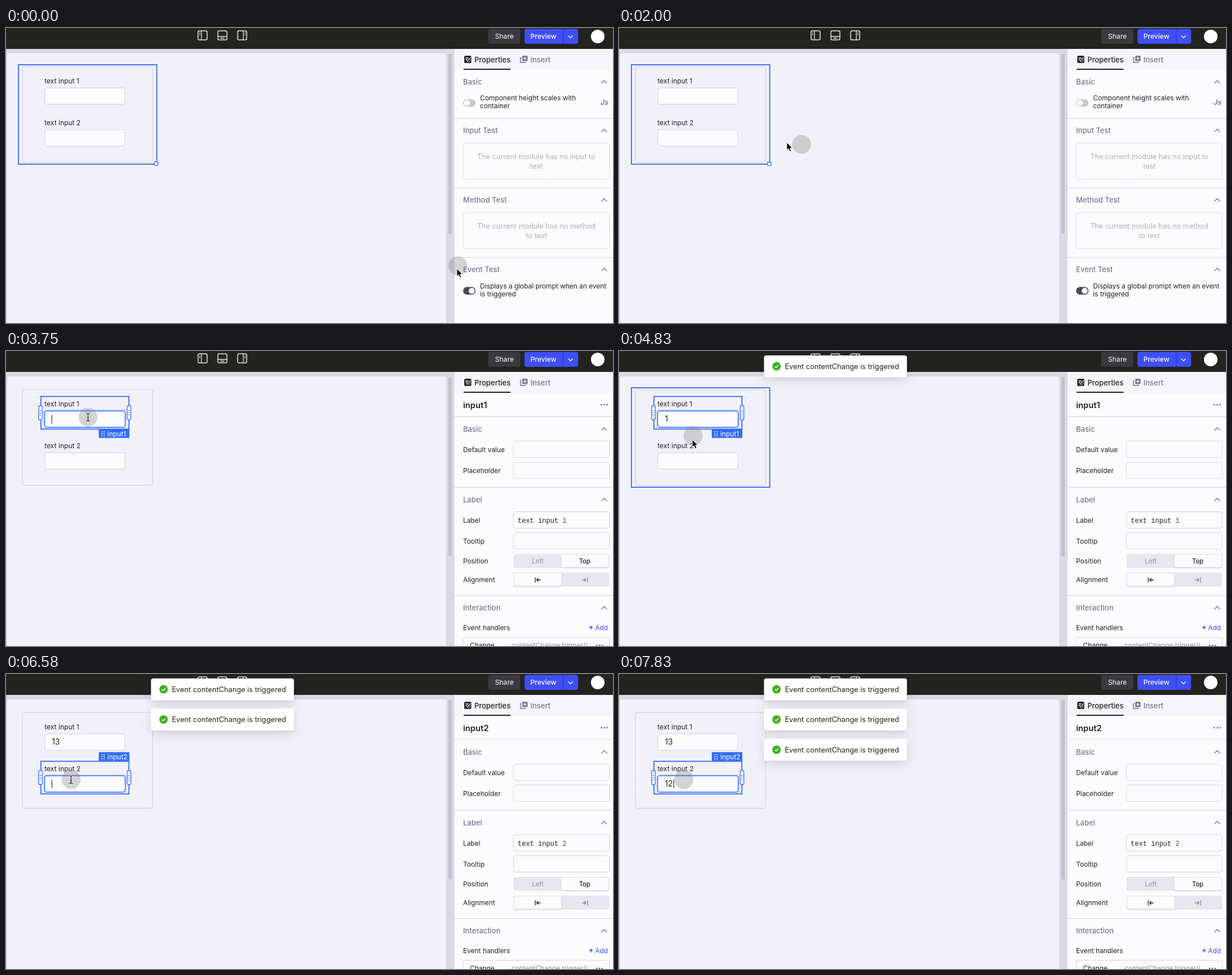
These frames come from a looping animation (1073 by 522 pixels, 8000 ms). An HTML page:

```html
<!DOCTYPE html>
<html lang="en">
<head>
<meta charset="utf-8">
<title>Module event test</title>
<style>
  html, body { margin: 0; width: 1073px; height: 522px; overflow: hidden; background: #dadae5; }
  svg { display: block; font-family: Inter, "Liberation Sans", sans-serif; }
  text { white-space: pre; }
  .toast rect {
    filter: drop-shadow(0 2px 2px rgba(0,0,0,.04)) drop-shadow(0 5.5px 7.4px rgba(0,0,0,.08))
      drop-shadow(0 8px 13px rgba(0,0,0,.06));
  }
  .raised { filter: drop-shadow(0 1px 1px rgba(0,0,0,.16)); }
</style>
</head>
<body>
<svg id="stage" width="1073" height="522" viewBox="0 0 1073 522"></svg>
<script>
const INK = '#222225', MUTED = '#77788f', BLUE = '#316cf9', LINE = '#d3d3df', PAPER = '#fcfcff';
const LOOP = 8000, SLOT = 53.5, BODY = 11.85, HEAD = 12.95;

// Markup helpers; text is placed by the vertical centre of its capitals.
const text = (x, cy, str, size = BODY, fill = INK, extra = '') =>
  `<text x="${x}" y="${cy + size * .36}" font-size="${size}" fill="${fill}" ${extra}>${str}</text>`;
const rect = (x, y, w, h, fill = 'none', stroke = 'none', r = 0, extra = '') =>
  `<rect x="${x}" y="${y}" width="${w}" height="${h}" rx="${r}" fill="${fill}" stroke="${stroke}" ${extra}/>`;
const path = (d, stroke, width = 1.3, extra = '') =>
  `<path d="${d}" fill="none" stroke="${stroke}" stroke-width="${width}" ${extra}/>`;
const dot = (x, y, r, fill) => `<circle cx="${x}" cy="${y}" r="${r}" fill="${fill}"/>`;
const group = (id, body, extra = '') => `<g id="${id}" ${extra}>${body}</g>`;
const MID = 'text-anchor="middle"', MEDIUM = ' font-weight="500"';

const divider = y => rect(793, y - .5, 280, 1.2, '#dadae8');
const section = (cy, title) => text(808, cy, title, HEAD, MUTED, MEDIUM) +
  path(`M1052.5 ${cy + 2.5}l5-5 5 5`, MUTED, 1.4);
const field = y => rect(897, y, 169.5, 29, PAPER, LINE, 4);
const ellipsis = (x, y) => [0, 5, 10].map(d => dot(x + d, y, 1.5, MUTED)).join('');
const toggle = (cy, fill, knob) => rect(808, cy - 6.8, 22, 13.6, fill, 'none', 6.8) + dot(knob, cy, 5.2, '#fff');

function topBar() {
  const frame = x => rect(x, 5, 16, 16, 'none', '#e6e6e8', 2.5, 'stroke-width="1.5"');
  const icons = frame(339.5) + path('M345.5 5v16M341.5 9h2M341.5 12h2', '#e6e6e8') +
    frame(374.5) + path('M374.5 15h16M379 18h7', '#e6e6e8') +
    frame(409.5) + path('M419.5 5v16M421.5 9h2M421.5 12h2', '#e6e6e8');
  return rect(0, 0, 1073, 37, '#232320') + icons +
    rect(852.5, 1.5, 56.5, 26.5, '#39393f', 'none', 4) + text(881, 15, 'Share', 12.1, '#fff', MID) +
    rect(916.5, 1.5, 94.8, 26.5, '#3d4ff5', 'none', 4) + rect(984.5, 1.5, 1, 26.5, '#2a36b8') +
    text(950, 15, 'Preview', 12.1, '#fff', MID + MEDIUM) +
    path('M994 13.500l4 4 4-4', '#fff', 1.5) + dot(1046, 15, 12, '#fff');
}

function tabs() {
  return rect(793, 37, 280, 485, PAPER) + rect(793, 37, 280, 37, '#f6f5fc') +
    rect(810, 49, 12.5, 13, INK, 'none', 2.5) +
    path('M812.5 53h5M812.5 56h3', '#fff', 1.3) +
    path('M816 60l6.5-7', '#f6f5fc', 4) + path('M816.5 60l6-6.5', INK, 2) +
    text(828, 56, 'Properties', HEAD, INK, MEDIUM) + rect(809, 72, 83, 2, INK) +
    path('M911 52.5h-1.5v8.5h8.5v-1.5', MUTED, 1.6) + rect(912.5, 49, 9.5, 9.5, MUTED, 'none', 1.5) +
    path('M917.25 51v5.5M914.5 53.75h5.5', '#f6f5fc', 1.3) +
    text(927, 56, 'Insert', HEAD, MUTED, MEDIUM);
}

function modulePanel() {
  const note = (y, first, second) =>
    rect(808, y, 258.5, 64, 'none', '#d3d3dc', 4, 'stroke-dasharray="3 2"') +
    text(937.5, y + 24, first, 12.6, '#aeaeb5', MID) + text(937.5, y + 40.5, second, 12.6, '#aeaeb5', MID);
  return section(95.5, 'Basic') + toggle(132.8, '#cbcacf', 814.8) +
    text(838, 124, 'Component height scales with') + text(838, 138, 'container') +
    text(1051, 131, 'Js', 12.5, MUTED, 'font-weight="600" font-style="italic"') +
    divider(160) + section(181.5, 'Input Test') + note(203.5, 'The current module has no input to', 'test') +
    divider(283) + section(304.5, 'Method Test') + note(326.5, 'The current module has no method', 'to test') +
    divider(406) + section(427.5, 'Event Test') + toggle(465, '#464b5b', 823.2) +
    text(838, 456.5, 'Displays a global prompt when an event') + text(838, 470.5, 'is triggered');
}

function inputPanel() {
  const label = (cy, name) => text(808, cy, name);
  const segment = (y, x) => rect(897, y, 169.5, 25, '#e8e7ef', 'none', 4) +
    rect(x, y + 1.2, 83.5, 22.6, PAPER, 'none', 3.5, 'class="raised"');
  return text(808, 95.5, '', 14.7, INK, 'id="title" font-weight="600"') + ellipsis(1052.5, 95) +
    divider(116) + section(138, 'Basic') +
    label(174.5, 'Default value') + field(159.5) + label(211.5, 'Placeholder') + field(196.5) +
    divider(241) + section(263, 'Label') + label(299.5, 'Label') + field(284.5) +
    `<text x="904.5" y="303.5" font-size="12" fill="${INK}" font-family="'Liberation Mono', monospace">text input <tspan id="labelDigit" fill="#2a5c4a"></tspan></text>` +
    label(336.5, 'Tooltip') + field(321.5) +
    label(371.5, 'Position') + segment(359, 981.7) +
    text(940, 371.5, 'Left', 11.2, '#9192a2', MID) + text(1023, 371.5, 'Top', 11.2, INK, MID + MEDIUM) +
    label(405, 'Alignment') + segment(392, 898.2) +
    path('M935.5 400.5v9M945 405h-7m3-3l-3 3 3 3', INK) +
    path('M1028 400.5v9M1018 405h7m-3-3l3 3-3 3', '#86879a') +
    divider(432.5) + section(454.5, 'Interaction') + label(489.5, 'Event handlers') +
    path('M1031 489.3h6.6M1034.3 486v6.6', '#3d4ff5', 1.6) +
    text(1064, 489.5, 'Add', BODY, '#3d4ff5', 'text-anchor="end"') +
    rect(808, 506.5, 258.5, 36, PAPER, LINE, 4) + text(820, 521, 'Change') +
    text(893.5, 521, 'contentChange.trigger()', BODY, '#9192a2') + ellipsis(1044, 521);
}

// Both inputs share one drawing, 74px apart.
function inputWidget(n) {
  const handle = x => rect(x, 96.5, 6.5, 25.5, '#fff', BLUE, 3, 'stroke-width="1.3"') +
    path(`M${x + 1.7} 105.5h3M${x + 1.7} 109.3h3M${x + 1.7} 113.1h3`, BLUE, 1);
  return `<g transform="translate(0 ${(n - 1) * 74})">` +
    text(68, 94, 'text input ' + n, 12.05) +
    group('outline' + n, rect(61.7, 80.5, 155.6, 57.7, 'none', BLUE, 0, 'stroke-width="1.8"')) +
    rect(68.5, 106, 142, 29, PAPER, '#cfcfd8', 4) +
    group('ring' + n, rect(67.2, 104.8, 144.6, 31.4, 'none', '#cfdcff', 5, 'stroke-width="2"') +
      rect(68.3, 106, 142.4, 29, PAPER, BLUE, 4, 'stroke-width="1.5"')) +
    text(81, 120.5, '', 13.8, INK, `id="value${n}"`) +
    group('caret' + n, rect(0, 113, 1.1, 15, INK)) +
    group('handles' + n, handle(57.7) + handle(214.2)) + '</g>';
}

function tag() {
  const grip = [0, 1, 2, 3, 4, 5].map(i => dot(169.5 + (i % 2) * 4, 143 + (i >> 1) * 3.5, 1, '#fff')).join('');
  return group('tag', rect(164, 138.3, 54, 15.5, BLUE) + grip +
    text(179, 146.5, '', 12, '#fff', 'id="tagName"'));
}

const toast = i => group('toast' + i, rect(256.3, 7.7, 252.7, 38.7, '#fff', 'none', 4) +
  dot(278.5, 27, 7.5, '#3fb01b') + path('M275.3 27.2l2.3 2.3 4.2-4.6', '#fff', 1.5) +
  text(293.2, 27.2, 'Event contentChange is triggered', 12.75), 'class="toast"');

const stage = document.getElementById('stage');
stage.innerHTML = topBar() +
  rect(0, 37, 793, 485, '#dadae5') + rect(2, 45, 776, 490, '#f2f1fa', 'none', 4) +
  rect(782, 46, 6, 318, '#c2c2cd', 'none', 3) +
  rect(29, 68, 230.5, 169.5, 'none', '#cfcfd5', 4) +
  group('boxOutline', rect(22, 65, 244.5, 176, 'none', BLUE, 0, 'stroke-width="1.8"')) +
  group('boxGrip', rect(262.3, 237, 6.4, 6.4, '#fff', BLUE, 1.5, 'stroke-width="1.3"')) +
  inputWidget(1) + inputWidget(2) + tag() + tabs() +
  group('modulePanel', modulePanel()) + group('inputPanel', inputPanel()) +
  [0, 1, 2, 3].map(toast).join('') +
  group('halo', dot(0, 0, 16.8, 'rgba(120,120,116,.3)')) +
  group('arrow', '<path d="M0 0v13.5l3.1-2.9 2.3 5.2 2.4-1-2.3-5h4.3z" fill="#000" stroke="#fff" stroke-width=".9"/>') +
  group('beam', ['#fff', '#111'].map((c, i) =>
    path('M-3.5-7q3 0 3.5 2 .5-2 3.5-2M0-5v10M-3.5 7q3 0 3.5-2 .5 2 3.5 2M-1.5 1.5h3', c, i ? 1.2 : 2.6)).join(''));

const el = {};
stage.querySelectorAll('[id]').forEach(node => el[node.id] = node);
const show = (id, on) => el[id].setAttribute('visibility', on ? 'visible' : 'hidden');
const move = (id, x, y) => el[id].setAttribute('transform', `translate(${x} ${y})`);
const within = (t, from, to) => t >= from && t < to;
const clamp = v => Math.min(1, Math.max(0, v));
const outCirc = u => Math.sqrt(1 - (1 - u) ** 2);
const inOutCirc = u => u < .5 ? (1 - Math.sqrt(1 - 4 * u * u)) / 2 : (1 + Math.sqrt(1 - (2 - 2 * u) ** 2)) / 2;

// Pointer route: time, x, y
const ROUTE = [
  [0, 799, 421], [85, 798, 421], [170, 791, 482], [260, 790, 483], [420, 815, 505], [660, 925, 500],
  [840, 1020, 450], [930, 1044, 405], [1080, 1046, 418], [1170, 1035, 419], [1340, 870, 440],
  [1500, 779, 447], [1590, 779, 447], [1750, 515, 306], [1830, 328, 206], [1920, 328, 206],
  [2000, 323, 206], [2080, 298, 198], [2320, 212, 148], [2520, 162, 120], [2750, 145, 114],
  [3420, 145, 114], [3750, 145, 117], [4540, 145, 117], [4700, 140, 135], [4830, 131, 150],
  [5000, 130, 154], [5330, 120, 165], [5950, 120, 165], [6170, 118, 181], [6400, 116, 186], [6750, 114.5, 187]
];
function pointer(t) {
  const i = ROUTE.findIndex(k => k[0] > t);
  if (i < 0) return ROUTE[ROUTE.length - 1].slice(1);
  const [t0, x0, y0] = ROUTE[i - 1], [t1, x1, y1] = ROUTE[i], u = (t - t0) / (t1 - t0);
  return [x0 + (x1 - x0) * u, y0 + (y1 - y0) * u];
}

const FOCUS = [2750, 6170], SELECT = [2830, 6250];
const KEYS = [[[4080, '1'], [5480, '3']], [[6920, '1'], [7420, '2']]];
const TOASTS = [4160, 5560, 7000, 7540], FIRST_LEAVES = 7180;
const CARET_X = [80.5, 87.8, 96.2];

function drawInput(n, t) {
  const typed = KEYS[n - 1].filter(k => t >= k[0]);
  const focused = t >= FOCUS[n - 1] && (n === 2 || t < FOCUS[1]);
  const selected = t >= SELECT[n - 1] && (n === 2 || t < SELECT[1]);
  const hovered = n === 1 ? within(t, 2250, SELECT[0]) : t >= 5420;
  const since = typed.length ? typed[typed.length - 1][0] : FOCUS[n - 1];
  el['value' + n].textContent = typed.map(k => k[1]).join('');
  show('outline' + n, selected || hovered);
  show('handles' + n, selected);
  show('ring' + n, focused);
  show('caret' + n, focused && (t - since) % 1000 < 500);
  move('caret' + n, CARET_X[typed.length], 0);
}

function drawToasts(t) {
  const gone = inOutCirc(clamp((t - FIRST_LEAVES) / 300));
  const height = Math.min(SLOT - 14.8 * gone, 139 * (1 - gone));
  TOASTS.forEach((start, i) => {
    const entered = outCirc(clamp((t - start) / 250));
    const lift = i ? SLOT - height : 7.4 * gone;
    move('toast' + i, 0, i * SLOT - SLOT * (1 - entered) - lift);
    el['toast' + i].setAttribute('opacity', entered * (i ? 1 : 1 - gone));
    show('toast' + i, t >= start && (i > 0 || gone < 1));
  });
}

function drawPointer(t) {
  const [x, y] = pointer(t + 80);
  const overInput = within(x, 68, 211) && (within(y, 106, 135) || within(y, 178, 209));
  const typing = within(t, 4080, 4480) || t >= 6920;
  move('halo', ...pointer(t));
  move('arrow', x - 1, y + 5);
  move('beam', x, y);
  show('arrow', !overInput);
  show('beam', overInput && !typing);
}

function draw(t) {
  const current = t < SELECT[1] ? 1 : 2;
  show('modulePanel', t < SELECT[0]);
  show('inputPanel', t >= SELECT[0]);
  el.title.textContent = 'input' + current;
  el.labelDigit.textContent = current;
  show('boxOutline', t < SELECT[0] || within(t, 4620, 5420));
  show('boxGrip', t < SELECT[0]);
  show('tag', t >= 2250);
  el.tagName.textContent = t < 5420 ? 'input1' : 'input2';
  drawInput(1, t);
  drawInput(2, t);
  drawToasts(t);
  drawPointer(t);
}

const began = performance.now();
function tick() {
  draw((performance.now() - began) % LOOP);
  requestAnimationFrame(tick);
}
tick();
</script>
</body>
</html>
```
